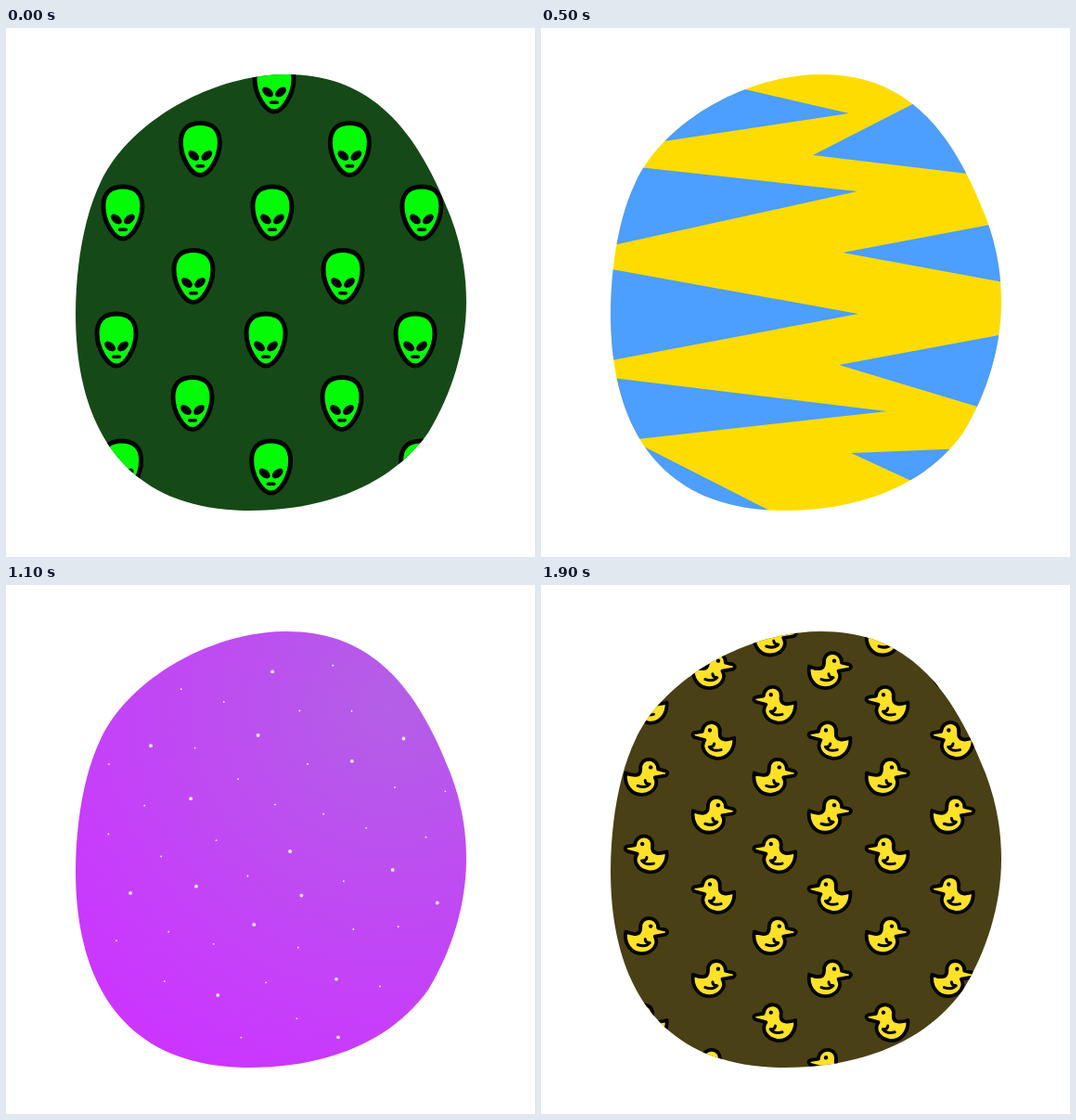
An HTML page for the animation above (2 s loop, 570 by 570 pixels).

```html
<!DOCTYPE html>
<html lang="en">
<head>
<meta charset="utf-8">
<title>Shifting blob</title>
<style>
  html, body { margin: 0; width: 100%; height: 100%; overflow: hidden; background: #fff; }
  svg { display: block; width: 100vw; height: 100vh; }
  .slot { visibility: hidden; animation: show 2s step-end infinite; }
  @keyframes show {
    0% { visibility: visible; }
    5%, 100% { visibility: hidden; }
  }
</style>
</head>
<body>
<svg viewBox="0 0 570 570">
  <defs>
    <path id="blob" d="M302 50C384 50 438 96 479 203C490 232 496 262 496 295C496 345 480 395 455 436C413 495 340 520 262 520C128 520 75 430 75 308C75 258 84 203 102 166C132 102 220 50 302 50Z"/>
    <clipPath id="mask"><use href="#blob"/></clipPath>
    <radialGradient id="glow" gradientUnits="userSpaceOnUse" cx="415" cy="130" r="430">
      <stop offset="0" stop-color="#b35fe6"/>
      <stop offset="1" stop-color="#cb36ff"/>
    </radialGradient>
    <g id="alien">
      <path fill="#03fb08" stroke="#000" stroke-width="5" d="M0-28C14-28 21-20 21-7C21 9 10 28 0 28C-10 28-21 9-21-7C-21-20-14-28 0-28Z"/>
      <ellipse rx="6.8" ry="4.2" transform="translate(-7 7)rotate(40)"/>
      <ellipse rx="6.8" ry="4.2" transform="translate(7 7)rotate(-40)"/>
      <rect x="-5" y="16.5" width="10" height="3.6" rx="1.8"/>
    </g>
    <path id="star" fill="#fff" d="M.05-1Q.19-.13 .8 .08Q.13 .3 0 1Q-.2 .27-.8 .08Q-.06-.1 .05-1Z"/>
    <g id="duck" stroke="#000" stroke-linejoin="round" stroke-linecap="round">
      <path fill="#ffe128" stroke-width="3.8" d="M-13-9C-13-23 7-23 6-9C6 0 15-2 22-5C24 8 16 19 4 18.5C-8 17.5-14 8-9.5 0L-21-2Q-25-5-21-7Z"/>
      <circle cx="-5" cy="-11" r="2.2" stroke="none"/>
      <path fill="none" stroke-width="3" d="M1 3Q1 7-4 7Q0 12 9 9"/>
    </g>
  </defs>
</svg>
<script>
const svg = document.querySelector('svg');
const defs = svg.querySelector('defs');

const times = (n, draw) => Array.from({ length: n }, (_, i) => draw(i)).join('');
const place = (id, x, y, extra = '') =>
  `<use href="#${id}" transform="translate(${x} ${y})${extra}"/>`;

// Staggered columns that sway gently from top to bottom.
const aliens = times(5, col => times(4 - col % 2, row => {
  const y = 62 + 137 * (row + col % 2 / 2);
  const x = 124 + 80.5 * col + 5 * Math.cos((y - 110) / 75);
  return place('alien', x, y);
}));

// Staggered columns whose rows spread out downwards; facing flips every second half row.
const ducks = times(6, col => times(6, row => {
  const step = row * 2 + col % 2;
  const x = 115 + 66 * col + 6 * Math.sin(1.26 * col - .3);
  const y = 57 + 35 * step + .65 * step ** 2;
  return place('duck', x, y, step % 4 < 2 ? 'scale(-1 1)' : 'rotate(5)');
}));

// Sunflower spiral: evenly scattered dots, every third one larger.
const specks = times(48, i => {
  const angle = i * 2.4;
  const reach = Math.sqrt((i + .5) / 48);
  const x = 286 + 197 * reach * Math.cos(angle);
  const y = 287 + 222 * reach * Math.sin(angle);
  return `<circle cx="${x}" cy="${y}" r="${i % 3 ? .9 : 1.9}" fill="#fff" fill-opacity=".9"/>`;
});

const sparkles = [
  [449, 303, 30], [205, 118, 20], [433, 186, 20], [129, 385, 19.5], [147, 437, 15.5],
  [198, 345, 15], [327, 78, 10.5], [395, 126, 10.5], [123, 183, 10.5], [93, 322, 10.5]
].map(([x, y, r]) => place('star', x, y, `scale(${r})`)).join('');

const tooth = (edge, tipX, tipY, top, bottom) =>
  `<path d="M${tipX} ${tipY}L${edge} ${top}V${bottom}Z"/>`;
const teeth = '<g fill="#4c9eff">' +
  tooth(60, 332, 92, 29, 133) + tooth(60, 341, 176, 145, 238) +
  tooth(60, 342, 308, 257, 361) + tooth(60, 373, 413, 375, 448) +
  tooth(60, 264, 529, 425, 560) +
  tooth(510, 293, 137, 26, 163) + tooth(510, 325, 242, 207, 276) +
  tooth(510, 321, 363, 328, 420) + tooth(510, 334, 458, 451, 539) + '</g>';

// Each run is a quadratic curve [bumps, endX, endY, controlX, controlY] set with arcs.
const bush = (color, [startX, startY], runs, rest) => {
  let x = startX, y = startY, d = `M${x} ${y}`;
  for (const [bumps, endX, endY, ctrlX = endX, ctrlY = endY] of runs) {
    const [fromX, fromY] = [x, y];
    for (let i = 1; i <= bumps; i++) {
      const t = i / bumps;
      const along = (a, b, c) => a * (1 - t) ** 2 + 2 * b * t * (1 - t) + c * t * t;
      const [nextX, nextY] = [along(fromX, ctrlX, endX), along(fromY, ctrlY, endY)];
      const r = .53 * Math.hypot(nextX - x, nextY - y);
      d += `A${r} ${r} 0 0 1 ${nextX} ${nextY}`;
      [x, y] = [nextX, nextY];
    }
  }
  return `<path fill="${color}" d="${d}L${rest}Z"/>`;
};
const dark = '#1d871c', light = '#228e21';
const bushes =
  bush(dark, [72, 272], [[1, 121, 281], [2, 168, 332, 153, 335]], '168 450 60 450') +
  bush(light, [108, 440],
    [[4, 172, 321, 128, 385], [1, 220, 324], [5, 290, 522, 268, 390]], '90 530') +
  bush(dark, [368, 500],
    [[1, 343, 497], [2, 310, 431, 317, 470], [6, 377, 233, 314, 346], [3, 457, 233, 416, 166]],
    '470 300 400 480') +
  bush(light, [368, 505],
    [[1, 366, 460], [6, 457, 236, 394, 346], [1, 489, 233]], '520 240 520 510');

const scenes = {
  aliens: ['#164918', aliens],
  bushes: ['#43b243', bushes],
  zigzag: ['#ffdc00', teeth],
  sparkles: ['#ffcc06', sparkles],
  plain: ['#215785', ''],
  dusk: ['url(#glow)', specks],
  ducks: ['#494015', ducks]
};

const order = `aliens sparkles plain bushes dusk zigzag ducks aliens plain sparkles
  bushes dusk zigzag plain ducks sparkles dusk aliens bushes ducks`.split(/\s+/);

defs.insertAdjacentHTML('beforeend', Object.entries(scenes).map(([name, [fill, art]]) =>
  `<g id="scene-${name}"><use href="#blob" fill="${fill}"/><g clip-path="url(#mask)">${art}</g></g>`).join(''));

svg.insertAdjacentHTML('beforeend', order.map((name, i) =>
  `<use class="slot" href="#scene-${name}" style="animation-delay:${(i - order.length) * 100}ms"/>`).join(''));
</script>
</body>
</html>
```
